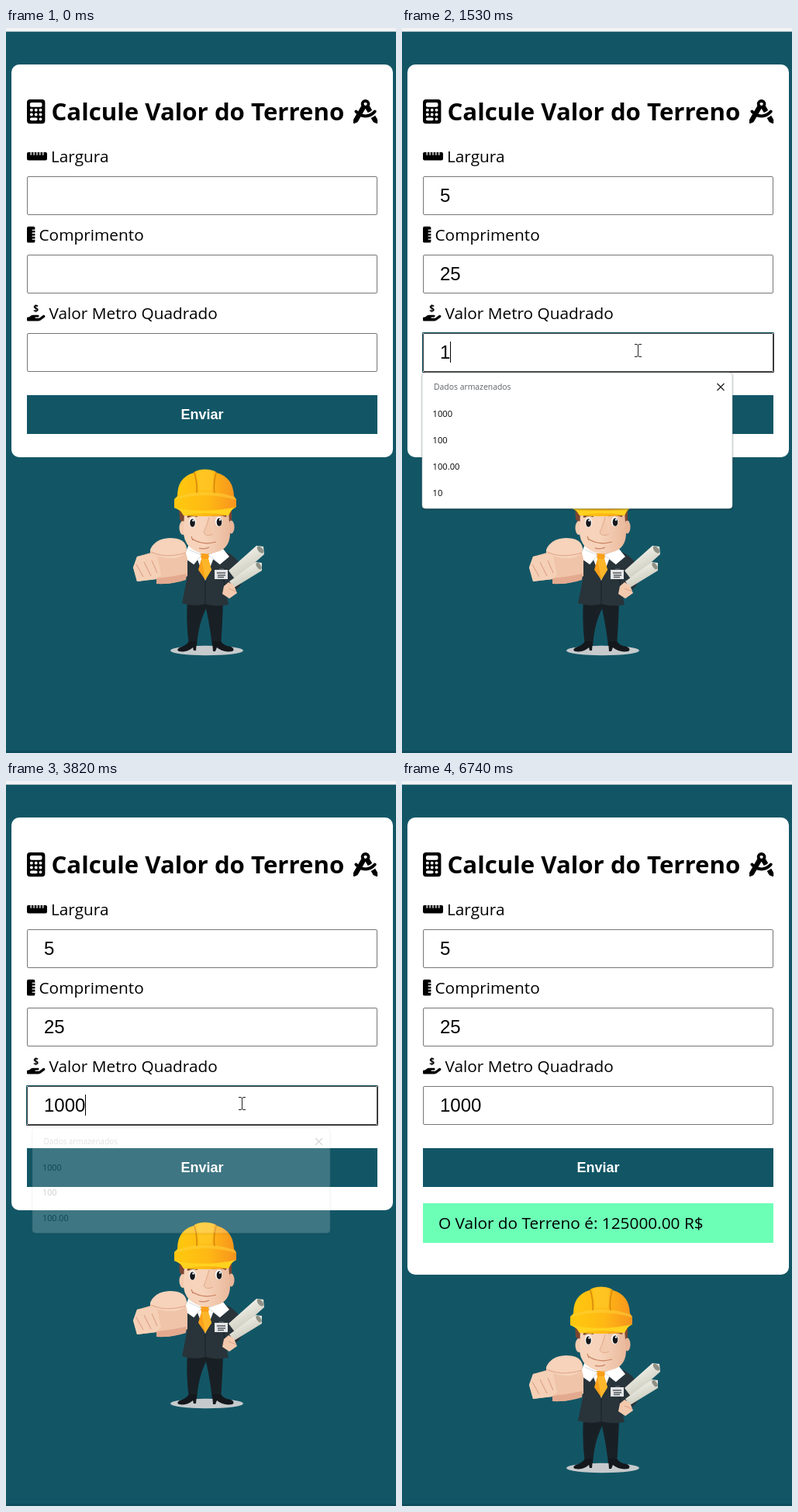
These frames come from a looping animation (503 by 934 pixels, 7870 ms). An HTML page:

```html
<!DOCTYPE html>
<html lang="pt">
<head>
<meta charset="utf-8">
<title>Calcule Valor do Terreno</title>
<style>
  html, body { margin: 0; width: 100%; height: 100%; overflow: hidden; background: #125666; }
  svg { display: block; }
  text { font: 20.8px "Open Sans", sans-serif; white-space: pre; }
  .title { font-size: 31.2px; font-weight: 700; }
  .value { font: 24px "Liberation Sans", Arial, sans-serif; }
  .send { font: bold 18px "Liberation Sans", Arial, sans-serif; fill: #fff; text-anchor: middle; }
  .head { font-size: 10.4px; fill: #5f6368; }
  .row { font-size: 11.2px; }
  .border { fill: #fff; stroke: #767676; }
  .line { fill: none; }
</style>
</head>
<body>
<svg width="503" height="934" viewBox="0 0 503 934">
  <defs>
    <linearGradient id="hat"><stop offset=".1" stop-color="#ffc60f"/><stop offset=".55" stop-color="#ffb814"/><stop offset="1" stop-color="#f7931e"/></linearGradient>
    <linearGradient id="skin"><stop offset=".45" stop-color="#f6d3ba"/><stop offset="1" stop-color="#eab99c"/></linearGradient>
    <linearGradient id="paper" x2=".6" y2="1"><stop offset=".2" stop-color="#f7f6ef"/><stop offset=".9" stop-color="#c9c8ba"/></linearGradient>
    <filter id="shadow" x="-5%" y="-5%" width="110%" height="115%"><feDropShadow dx="0" dy="1" stdDeviation="1.2" flood-opacity=".45"/></filter>
  </defs>

  <rect width="503" height="934" fill="#125666"/>
  <rect width="503" height="4" fill="#f1f3f4"/>
  <rect y="4" width="503" height="1" fill="#a9bdc2"/>
  <rect y="931" width="503" height="3" fill="#0f4c5b"/>

  <g id="man">
    <ellipse cx="259" cy="802" rx="47" ry="6.3" fill="#c6cacc"/>
    <g fill="#14181d">
      <path d="M234 738H280Q279 772 277 796H266Q263 770 258 748Q248 768 246 796H236Q232 768 234 738Z" fill="#192025"/>
      <path d="M236 790H246L245 802H242L241 798Q234 805 223 803Q219 801 224 798Q232 796 236 790Z"/>
      <path d="M266 790H277Q281 796 290 797Q296 800 292 803Q280 805 272 798L270 803H267Z"/>
    </g>
    <path d="M231 682L241 671H274Q297 678 306 697Q311 707 300 721L291 727L282 719L287 743Q272 746 257 742Q242 746 227 741L233 711Z" fill="#28343a"/>
    <path d="M257 712V742M282 719L279 699" class="line" stroke="#182127"/>
    <path d="M240 666H274L257 712Z" fill="#fff"/>
    <path d="M250 677H263L261 684L265 698L257 711L248 698L252 684Z" fill="#f9a01b"/>
    <path d="M252 684H261L265 698L257 711Z" fill="#fdb62a"/>
    <path d="M236 665L252 679L242 691L229 682ZM275 665L288 681L276 691L261 679Z" fill="#fff"/>
    <path d="M236 672L252 679L242 691M276 672L261 679L276 691" class="line" stroke="#d5dadd"/>

    <g fill="#7a4632"><path d="M223 616H236V634L230 640L224 633Z"/><path d="M280 616H291V634L286 640Z"/></g>
    <ellipse cx="228" cy="644" rx="4.5" ry="9" fill="#f3cbb0"/>
    <ellipse cx="290.5" cy="643" rx="4" ry="8.5" fill="#e9b598"/>
    <path d="M230 622H287L289 652Q288 671 272 675Q257 681 243 673Q231 667 229 652Z" fill="url(#skin)"/>
    <path d="M262 630Q258 644 255 650Q258 656 267 652" fill="#f3c9ad" stroke="#e2a98b"/>
    <path d="M240 658Q254 667 271 662M239 655L241 660M249 670Q256 672 262 669" class="line" stroke="#c98263" stroke-width="1.3"/>
    <path d="M234 630Q240 626 247 629M266 628Q276 625 284 629" class="line" stroke="#6b3f2c" stroke-width="2.4"/>
    <g fill="#fff"><ellipse cx="240.500" cy="637" rx="4.500" ry="6.500"/><ellipse cx="274.500" cy="636" rx="4.500" ry="6.500"/></g>
    <g fill="#15171a"><ellipse cx="240.500" cy="637.500" rx="3.300" ry="5.300"/><ellipse cx="275" cy="636.500" rx="3.300" ry="5.300"/></g>
    <g fill="#fff"><circle cx="241.500" cy="634.500" r="1.200"/><circle cx="276" cy="633.500" r="1.200"/></g>

    <path d="M221 603Q221 579 242 573Q245 569 257 568.500Q269 569 272 573Q293 579 294 603L297 607V617Q291 619 287 628Q257 630 229 628Q225 620 217 618V607Z" fill="url(#hat)"/>
    <path d="M221 604Q257 591 294 604L297 608Q257 596 217 608Z" fill="#ffd23a" opacity=".55"/>
    <path d="M229 628Q225 620 217 618Q257 626 297 617Q291 619 287 628Q257 622 229 628Z" fill="#ffd21f"/>
    <path d="M243 573Q247 587 246 599M271 573Q267 587 269 599" class="line" stroke="#d98a0c" stroke-width="1.600"/>
    <path d="M246 571Q257 567 268 571L266 597Q257 595 249 597Z" fill="#ffc927" opacity=".7"/>

    <path d="M164 695L169 681L190 675L231 672L234 684V706Q220 716 204 716L194 710L169 713Z" fill="#f0c4a8"/>
    <path d="M164 695L169 681L194 676L200 704L194 710L169 713Z" fill="#f5d0b6"/>
    <path d="M194 709Q214 707 233 703L232 711Q215 717 194 716Z" fill="#e3aa8f"/>
    <path d="M186 672Q192 658 211 657Q231 657 233 670Q234 680 217 683Q200 684 186 676Z" fill="#f6d3ba"/>
    <path d="M187 675Q206 684 232 676M168 691L177 707M178 688L187 706M188 686L195 702" class="line" stroke="#dfa58a" stroke-width="1.200"/>

    <g fill="url(#paper)">
      <path d="M287 699L323 667L332 668L333 678L296 711Z"/>
      <path d="M288 713L322 688L330 689L330 699L294 721Z"/>
    </g>
    <g fill="#8f9187"><ellipse cx="328" cy="672" rx="3" ry="5.500" transform="rotate(-40 328 672)"/><ellipse cx="326" cy="693" rx="2.600" ry="5" transform="rotate(-35 326 693)"/></g>
    <path d="M281 719L287 714L294 718L298 728L288 735L279 729Z" fill="#f3c9ad"/>
    <path d="M287 722L297 726" class="line" stroke="#dda388"/>
    <rect x="269" y="698" width="17" height="12" fill="#e3e5e6"/>
    <path d="M275 697H281M272 702H283M273 705H283M273 707.500H281" class="line" stroke="#555b60" stroke-width="1.300"/>
  </g>

  <rect id="card" x="7" y="47" width="492" height="506" rx="10" fill="#fff"/>

  <g transform="translate(27 92) scale(.0609)">
    <rect width="384" height="512" rx="64"/>
    <g fill="#fff">
      <rect x="64" y="64" width="256" height="96" rx="32"/>
      <path d="M96 224H96.100M192 224H192.100M288 224H288.100M96 320H96.100M192 320H192.100M288 320H288.100M96 416H192M288 416H288.100" stroke="#fff" stroke-width="64" stroke-linecap="round"/>
    </g>
  </g>
  <text class="title" x="58.500" y="119">Calcule Valor do Terreno</text>
  <g transform="translate(448 92) scale(.0609)">
    <circle cx="256" cy="96" r="64" class="line" stroke="#000" stroke-width="64"/>
    <path d="M56 256Q135 352 256 352T456 256" class="line" stroke="#000" stroke-width="64" stroke-linecap="round"/>
    <path d="M169 136L6 417Q0 428 0 441V496Q4 514 23 510L79 483Q92 476 99 464L256 192L307 281Q358 267 396 227L343 136Z"/>
    <path d="M373 394Q422 375 462 341L505 416Q512 428 512 441V496Q508 514 489 510L433 483Q420 476 413 464Z"/>
    <circle cx="256" cy="96" r="32" fill="#fff"/>
  </g>

  <g transform="translate(27 154.800) scale(.0406)">
    <rect y="128" width="640" height="256" rx="48"/>
    <path d="M128 100V208M224 100V208M320 100V208M416 100V208M512 100V208" stroke="#fff" stroke-width="32" stroke-linecap="round"/>
  </g>
  <text x="58" y="173">Largura</text>
  <g transform="translate(27 255.800) scale(.0406)">
    <rect width="256" height="512" rx="48"/>
    <path d="M280 112H176M280 208H176M280 304H176M280 400H176" stroke="#fff" stroke-width="32" stroke-linecap="round"/>
  </g>
  <text x="42.500" y="274">Comprimento</text>
  <path transform="translate(27 356.800) scale(.0406)" d="M560 392c18-13 21-38 8-56s-38-21-56-8L393 416H272c-9 0-16-7-16-16s7-16 16-16h80c18 0 32-14 32-32s-14-32-32-32H194c-29 0-57 10-80 28L68 384H32c-18 0-32 14-32 32v64c0 18 14 32 32 32H352c29 0 57-9 81-26z"/>
  <text x="38.700" y="366" text-anchor="middle" style="font-size:12px;font-weight:700">$</text>
  <text x="55.500" y="375">Valor Metro Quadrado</text>

  <g id="fields"></g>
  <g id="focus" class="line">
    <path d="M26.500 51.500V.500H479" stroke="#125666"/>
    <path d="M26.500 51.500H479.500V.500" stroke="#333"/>
  </g>
  <rect id="caret" width="1" height="27"/>

  <rect id="button" x="27" y="473" width="452" height="50"/>
  <text class="send" x="253" y="504">Enviar</text>
  <g id="result">
    <rect x="27" y="544" width="452" height="51" fill="#6cffb6"/>
    <text x="47" y="577">O Valor do Terreno é: 125000.00 R$</text>
  </g>

  <g id="list">
    <rect id="panel" width="400" rx="4" fill="#fff" stroke="#aab4b8" stroke-width=".5" filter="url(#shadow)"/>
    <text class="head" x="15" y="22">Dados armazenados</text>
    <path d="M380.500 14L389.500 23M389.500 14L380.500 23" stroke="#222" stroke-width="1.300"/>
  </g>

  <g id="mouse">
    <circle id="halo" cx="-2" cy="-1" r="12" fill="#ffff80"/>
    <path id="beam" d="M-4 -7.500H-1L.500 -6.500L2 -7.500H5M-4 8.500H-1L.500 7.500L2 8.500H5M.500 -6.500V7.500" class="line" stroke="#222"/>
    <path id="arrow" d="M0 0V16.500L3.800 13L6.300 18.600L8.900 17.500L6.400 12H11.600Z" fill="#fff" stroke="#000"/>
    <path id="hand" d="M-1.500 1Q0 -1.500 1.500 1V7Q4 6 4.500 8Q7 7 7.500 9Q10 8.500 10 11V15L8 20H-.500Q-2 16 -5 12Q-5 9 -1.500 12Z" fill="#fff" stroke="#000" stroke-width=".9"/>
  </g>
</svg>
<script>
const LOOP = 7870;
const SUBMIT = 5310;
const FIELD_TOPS = [191, 292, 393];
const $ = id => document.getElementById(id);
const show = (node, visible) => node.style.display = visible ? "" : "none";
const within = (v, from, to) => v >= from && v < to;

function add(parent, tag, attributes) {
  const node = document.createElementNS("http://www.w3.org/2000/svg", tag);
  for (const key in attributes) node.setAttribute(key, attributes[key]);
  return parent.appendChild(node);
}

const fields = FIELD_TOPS.map(top => ({
  top,
  box: add($("fields"), "rect", { class: "border", x: 27.5, y: top + .5, width: 451, height: 49, rx: 1.5 }),
  text: add($("fields"), "text", { class: "value", x: 49, y: top + 33 })
}));
const rows = [0, 1, 2, 3].map(i => add($("list"), "text", { class: "row", x: 13.5, y: 57 + 34 * i }));

// Each track lists [start time, value]; a value holds until the next entry.
const typed = [
  [[0, ""], [910, "5"]],
  [[0, ""], [1200, "2"], [1330, "25"]],
  [[0, ""], [1530, "1"], [1990, "10"], [2140, "100"], [3680, "1000"]]
];
const focusTrack = [[0, -1], [840, 0], [1130, 1], [1530, 2], [SUBMIT, -1]];
const caretTrack = [[0, 1], [2670, 0], [3150, 1], [3610, 0], [3680, 1], [4210, 0], [4680, 1], [5240, 0]];
const listTrack = [
  [0, []], [1200, ["25", "250"]], [1530, ["1000", "100", "100.00", "10"]],
  [2210, ["1000", "100", "100.00"]], [3890, []]
];
const fadeTrack = [[0, 1], [3750, .65], [3820, .19]];
const path = [
  [70, 262, 788], [690, 254, 222], [950, 254, 222], [1130, 304, 415], [4110, 304, 415],
  [4290, 240, 466], [4450, 240, 466], [4770, 185, 492], [5990, 185, 492], [6740, 215, 888]
];

const at = (track, t) => track.filter(([start]) => start <= t).pop()[1];

function mouseAt(t) {
  const i = Math.max(1, path.findIndex(([time]) => time > t));
  const [t0, x0, y0] = path[i - 1], [t1, x1, y1] = path[i];
  const p = Math.min(1, Math.max(0, (t - t0) / (t1 - t0)));
  const eased = p * p * (3 - 2 * p);
  return [x0 + (x1 - x0) * eased, y0 + (y1 - y0) * eased];
}

function drawMouse(t) {
  const visible = within(t, 70, 6740);
  const [x, y] = mouseAt(visible ? t : 70);
  const hovered = visible ? FIELD_TOPS.findIndex(top => within(y, top, top + 50)) : -1;
  const onButton = visible && within(y, 473, 523);
  show($("mouse"), visible);
  $("mouse").setAttribute("transform", `translate(${Math.round(x)} ${Math.round(y)})`);
  show($("halo"), within(t, 760, 840) || within(t, 5240, SUBMIT));
  show($("beam"), hovered >= 0);
  show($("hand"), onButton);
  show($("arrow"), hovered < 0 && !onButton);
  $("button").setAttribute("fill", onButton ? "#0a2f38" : "#125666");
  fields.forEach((field, i) => field.box.style.stroke = i === hovered ? "#444" : "");
}

function drawFields(t) {
  fields.forEach((field, i) => field.text.textContent = at(typed[i], t));
  const active = at(focusTrack, t);
  show($("focus"), active >= 0);
  show($("caret"), active >= 0 && at(caretTrack, t));
  if (active < 0) return;
  const { top } = fields[active];
  $("focus").setAttribute("transform", `translate(0 ${top - 1})`);
  $("caret").setAttribute("x", Math.round(48.6 + 13.35 * at(typed[active], t).length));
  $("caret").setAttribute("y", top + 11);
}

function drawList(t) {
  const items = at(listTrack, t);
  show($("list"), items.length);
  if (!items.length) return;
  const height = 39 + 34 * items.length;
  const opacity = at(fadeTrack, t);
  const scale = .95 + .05 * opacity;
  const top = FIELD_TOPS[at(focusTrack, t)] + 51;
  rows.forEach((row, i) => row.textContent = items[i] || "");
  $("panel").setAttribute("height", height);
  $("list").setAttribute("opacity", opacity);
  $("list").setAttribute("transform",
    `translate(226 ${top + height / 2}) scale(${scale}) translate(-200 ${-height / 2})`);
}

function draw(t) {
  const done = t >= SUBMIT;
  show($("result"), done);
  $("card").setAttribute("height", done ? 589 : 506);
  $("man").setAttribute("transform", `translate(0 ${done ? 83 : 0})`);
  drawFields(t);
  drawList(t);
  drawMouse(t);
}

const begin = performance.now();
function tick() {
  draw((performance.now() - begin) % LOOP);
  requestAnimationFrame(tick);
}
tick();
</script>
</body>
</html>
```
